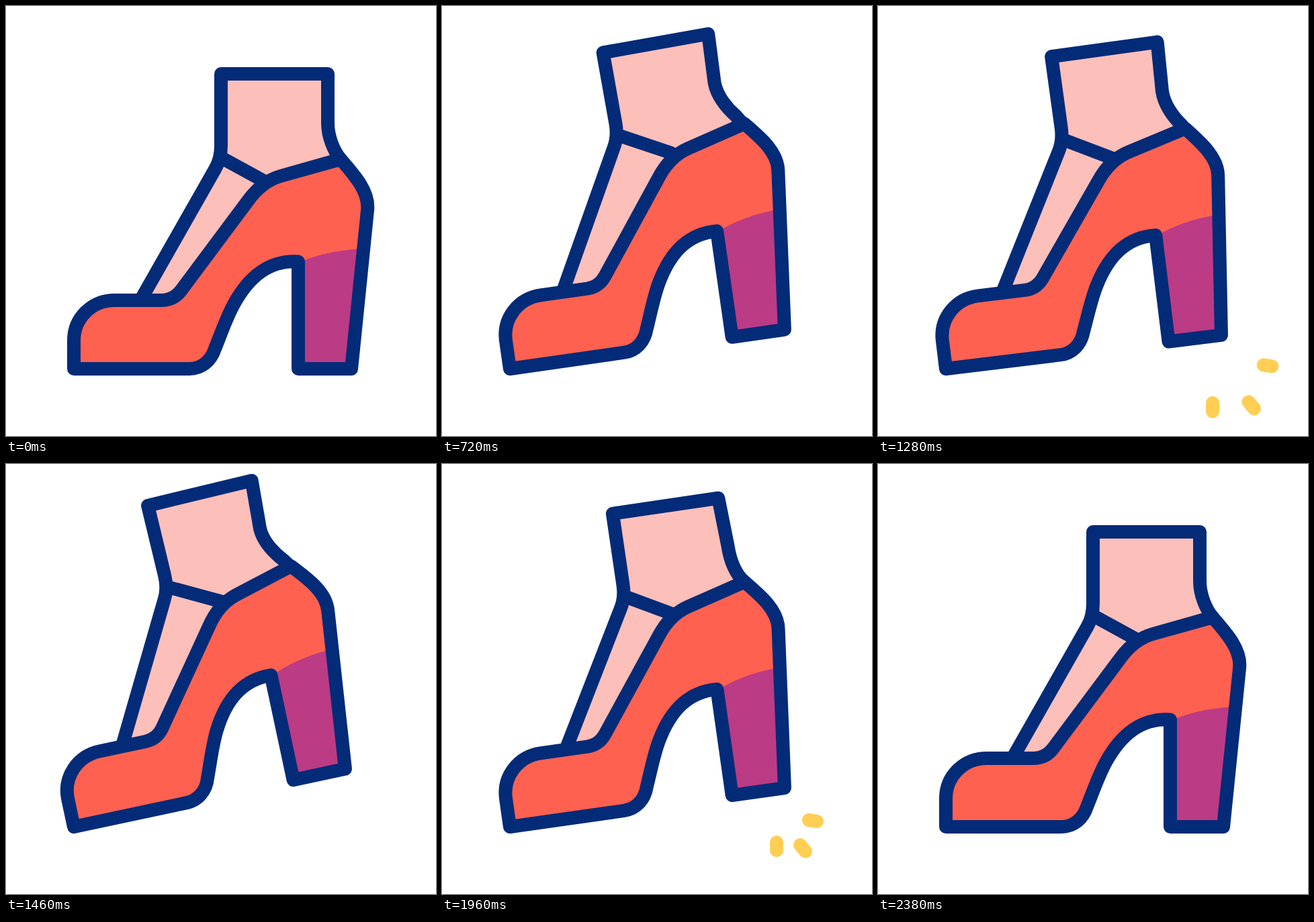
Recreate the animation shown at these times as an HTML page. Size 640 px wide and 640 px high, loop 3600 ms.

```html
<!DOCTYPE html>
<html lang="en">
<head>
<meta charset="utf-8">
<title>Tapping heel</title>
<style>
  html, body { margin: 0; width: 100%; height: 100%; overflow: hidden; background: #fff; }
  svg { display: block; width: 100%; height: 100%; }
  .line { stroke: #042b78; stroke-width: 20; stroke-linecap: round; stroke-linejoin: round; }
  .spark { stroke: #ffce54; stroke-width: 20; stroke-linecap: round; }
</style>
</head>
<body>
<svg viewBox="0 0 640 640">
  <g id="leg">
    <path id="skin" fill="#fdbfba"/>
    <path id="outline" class="line" fill="none"/>
    <path class="line" fill="none" d="M319 225L394 266"/>
  </g>
  <g id="shoe">
    <path id="body" fill="#ff6150"/>
    <path fill="#bb3b85" d="M435 382Q478 363 532 361.500L514 540H435Z"/>
    <path id="edge" class="line" fill="none"/>
  </g>
  <g id="sparks">
    <line class="spark"/>
    <line class="spark"/>
    <line class="spark"/>
  </g>
</svg>
<script>
const LOOP = 3600;
const PIVOT = "101 540";
const $ = id => document.getElementById(id);

const shoePath =
  "M101 540V498C101 464 128 438 162 438H232C243 438 253 433 260 424L360 290" +
  "C373 272 388 259 409 253L498 228C520 253 541 277 538 304L514 540H435V380.500" +
  "C392 378 362 402 339 444C328 464 320 488 311 510C305 529 290 540 273 540Z";
$("body").setAttribute("d", shoePath);
$("edge").setAttribute("d", shoePath);

// Keys are [time, value], joined with a soft ease.
const shoeKeys = [[300, 0], [565, 12.8], [630, 12.8], [850, 0], [980, 0],
  [1550, 12.8], [1580, 12.8], [1765, 0], [1890, 8.5], [2380, 0]];
const legKeys = [[300, 0], [565, 14.4], [640, 14.4], [860, 0], [980, 0],
  [1550, 14.4], [1590, 14.4], [1770, 0], [1890, 8.8], [2380, 0]];
const bendKeys = [[300, 0], [565, -5], [640, -5], [860, 0], [980, 0],
  [1550, -5], [1590, -5], [1770, 0], [1890, 4], [2380, 0]];

// Inner point and outer point of each spark.
const rays = [[498, 563, 498, 608], [533, 567, 563, 603], [546, 530, 591, 537]];
const bursts = [830, 1765];
const sparks = [...$("sparks").children];

const ease = u => (1 - Math.cos(Math.PI * Math.min(1, Math.max(0, u)))) / 2;

function at(keys, t) {
  const i = keys.findIndex(k => t < k[0]);
  if (i === 0) return keys[0][1];
  if (i < 0) return keys[keys.length - 1][1];
  const [t0, a] = keys[i - 1], [t1, b] = keys[i];
  return a + (b - a) * ease((t - t0) / (t1 - t0));
}

function turn(el, deg) {
  el.setAttribute("transform", `rotate(${-deg} ${PIVOT})`);
}

function drawLeg(bend) {
  const x = 479 + bend;
  const d = `M199 440L311 243C317 233 320 221 320 208V101H479L${x} 174` +
    `C${x} 195 488 216 498 228L506 241`;
  $("outline").setAttribute("d", d);
  $("skin").setAttribute("d", d + "L400 275L260 440Z");
}

function drawSparks(t) {
  const start = bursts.find(b => t >= b && t < b + 570);
  $("sparks").style.display = start === undefined ? "none" : "";
  if (start === undefined) return;
  const head = ease((t - start) / 570);
  const tail = ease((t - start - 290) / 280);
  rays.forEach(([x0, y0, x1, y1], i) => {
    const put = (n, u) => {
      sparks[i].setAttribute("x" + n, x0 + (x1 - x0) * u);
      sparks[i].setAttribute("y" + n, y0 + (y1 - y0) * u);
    };
    put(1, Math.min(tail, head - 0.001));
    put(2, head);
  });
}

function draw(t) {
  turn($("shoe"), at(shoeKeys, t));
  turn($("leg"), at(legKeys, t));
  drawLeg(at(bendKeys, t));
  drawSparks(t);
}

const begin = performance.now();
function tick() {
  draw((performance.now() - begin) % LOOP);
  requestAnimationFrame(tick);
}
tick();
</script>
</body>
</html>
```
